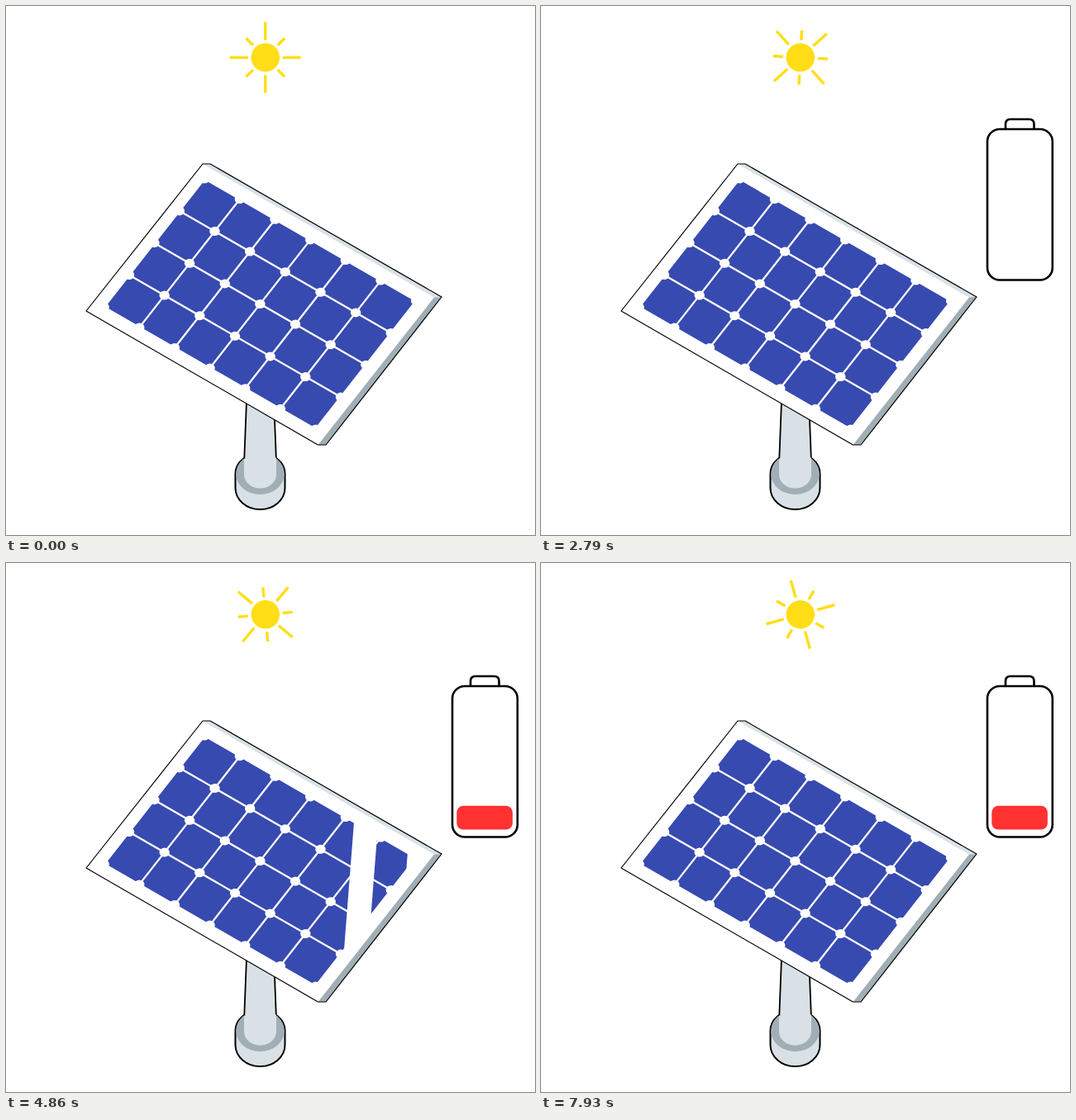
An HTML page that plays this animation: 640x640 px, repeating every 8 s.

```html
<!DOCTYPE html>
<html lang="en">
<head>
<meta charset="utf-8">
<title>Solar panel</title>
<style>
  html, body { margin: 0; width: 100%; height: 100%; overflow: hidden; background: #fff; }
  svg { display: block; width: 100vw; height: 100vh; }
</style>
</head>
<body>
<svg viewBox="0 0 640 640">
  <defs>
    <clipPath id="cellArea"><path id="cellOutline"/></clipPath>
  </defs>

  <g id="sun" stroke="#ffde17" stroke-width="3.4">
    <circle r="17.3" fill="#ffde17" stroke="none"/>
  </g>

  <g id="pole" stroke-linejoin="round">
    <path d="M277.5 566A30 25 0 0 1 337.5 566V583A30 26 0 0 1 277.5 583Z" fill="#d9e1e6" stroke="#000" stroke-width="2"/>
    <ellipse cx="307.5" cy="566" rx="29.3" ry="25" fill="#a1aeb6"/>
    <path d="M291 470L288 547V567A19.5 16.5 0 0 0 327 567V546L324 470Z" fill="#d9e1e6"/>
    <path d="M291 478L288.3 547.5M324.6 490L326.8 546.5" fill="none" stroke="#000" stroke-width="1.8"/>
  </g>

  <g id="panel">
    <path d="M97 369L238 191L518 352.5L377.5 531Z" fill="#fff"/>
    <path d="M238 191H247L527 352L518 352.5Z" fill="#d9e1e6"/>
    <path d="M518 352.5L527 352L387 531H377.5Z" fill="#a1aeb6"/>
    <path id="cells" fill="#374ab0"/>
    <path id="grid" fill="none" stroke="#fff" stroke-width="2.3"/>
    <g id="dots" fill="#fff"></g>
    <path id="glint" fill="#fff" clip-path="url(#cellArea)"/>
    <path d="M97 369L238 191H247L527 352L387 531H377.5Z" fill="none" stroke="#000" stroke-width="1.2" stroke-linejoin="round"/>
  </g>

  <g id="waves" fill="none" stroke="#ffde17" stroke-width="15.2"></g>

  <g id="battery" fill="none" stroke="#000" stroke-width="2.6">
    <path d="M562 149V143Q562 137 568 137H590.5Q596.5 137 596.5 143V149"/>
    <rect x="540" y="149" width="78.8" height="182.5" rx="15"/>
    <rect id="charge" x="545.3" y="293.8" width="67.6" height="28.8" rx="8" fill="#ff3131" stroke="none"/>
  </g>
</svg>

<script>
const LOOP = 8000, FPS = 14;
const COLS = 6, ROWS = 4;
const el = id => document.getElementById(id);
const clamp = v => Math.max(0, Math.min(1, v));
const progress = (t, start, length) => clamp((t - start) / length);

function add(parent, tag, attrs) {
  const node = document.createElementNS('http://www.w3.org/2000/svg', tag);
  for (const name in attrs) node.setAttribute(name, attrs[name]);
  return parent.appendChild(node);
}

// Panel grid in its own slanted axes
const vertex = (c, r) => [240.25 + 42.65 * c - 30.4 * r, 209.1 + 24.6 * c + 38.8 * r];
const poly = points => 'M' + points.map(p => p.join(' ')).join('L') + 'Z';
const segment = (a, b) => `M${a.join(' ')}L${b.join(' ')}`;

function buildPanel() {
  const outline = poly([vertex(0, 0), vertex(COLS, 0), vertex(COLS, ROWS), vertex(0, ROWS)]);
  el('cells').setAttribute('d', outline);
  el('cellOutline').setAttribute('d', outline);
  let lines = outline;
  for (let c = 1; c < COLS; c++) lines += segment(vertex(c, 0), vertex(c, ROWS));
  for (let r = 1; r < ROWS; r++) lines += segment(vertex(0, r), vertex(COLS, r));
  el('grid').setAttribute('d', lines);
  for (let c = 0; c <= COLS; c++) {
    for (let r = 0; r <= ROWS; r++) {
      const [cx, cy] = vertex(c, r);
      add(el('dots'), 'ellipse', { cx, cy, rx: 6.2, ry: 5.5 });
    }
  }
}

function buildSun() {
  for (let i = 0; i < 8; i++) {
    add(el('sun'), 'path', { d: `M0 -21V${i % 2 ? -33 : -43}`, transform: `rotate(${i * 45})` });
  }
}

function buildWaves() {
  for (const dx of [0, 50]) {
    add(el('waves'), 'path', {
      d: 'M316 177C324 195 324 220 308 238S287 265 287 291',
      pathLength: 100, transform: `translate(${dx})`
    });
  }
}

// Two slanted stripes sweeping over the cells
function drawGlint(t) {
  const u = (t - 4290) / 570;
  const visible = t > 4100 && t < 5100;
  el('glint').style.display = visible ? '' : 'none';
  if (!visible) return;
  const slope = 0.05 + 0.028 * u;
  const at = (x, y) => [x - slope * (y - 360), y];
  const stripe = (left, right) => poly([at(left, 180), at(right, 180), at(right, 540), at(left, 540)]);
  el('glint').setAttribute('d',
    stripe(97 + 322 * u, 127.3 + 321 * u) + stripe(159.4 + 327.4 * u, 189 + 328 * u));
}

function drawWaves(t) {
  const head = 100 * progress(t, 5750, 430);
  const tail = 100 * progress(t, 6300, 430);
  el('waves').style.display = head > tail ? '' : 'none';
  for (const wave of el('waves').children) {
    wave.setAttribute('stroke-dasharray', head - tail >= 100 ? 'none' : `0 ${tail} ${head - tail} 200`);
  }
}

function drawBattery(t) {
  const u = progress(t, 700, 600);
  const rest = (1 - u) ** 3;
  el('battery').setAttribute('opacity', clamp(u * 4));
  el('battery').setAttribute('transform',
    `translate(${-8 * rest} ${-42 * rest}) rotate(${-32 * rest} 579.4 234)`);
  const period = 1428.6;
  const phase = (t - 530 + period) % period;
  el('charge').style.display = t > 1500 && phase < period / 2 ? '' : 'none';
}

function draw(now) {
  const frame = Math.floor((now % LOOP + 5) * FPS / 1000) % (LOOP * FPS / 1000);
  const t = frame * 1000 / FPS;
  el('sun').setAttribute('transform', `translate(313.8 62.3) rotate(${-0.04737 * t})`);
  drawGlint(t);
  drawWaves(t);
  drawBattery(t);
}

buildPanel();
buildSun();
buildWaves();
const start = performance.now();
function tick() {
  draw(performance.now() - start);
  requestAnimationFrame(tick);
}
tick();
</script>
</body>
</html>
```
